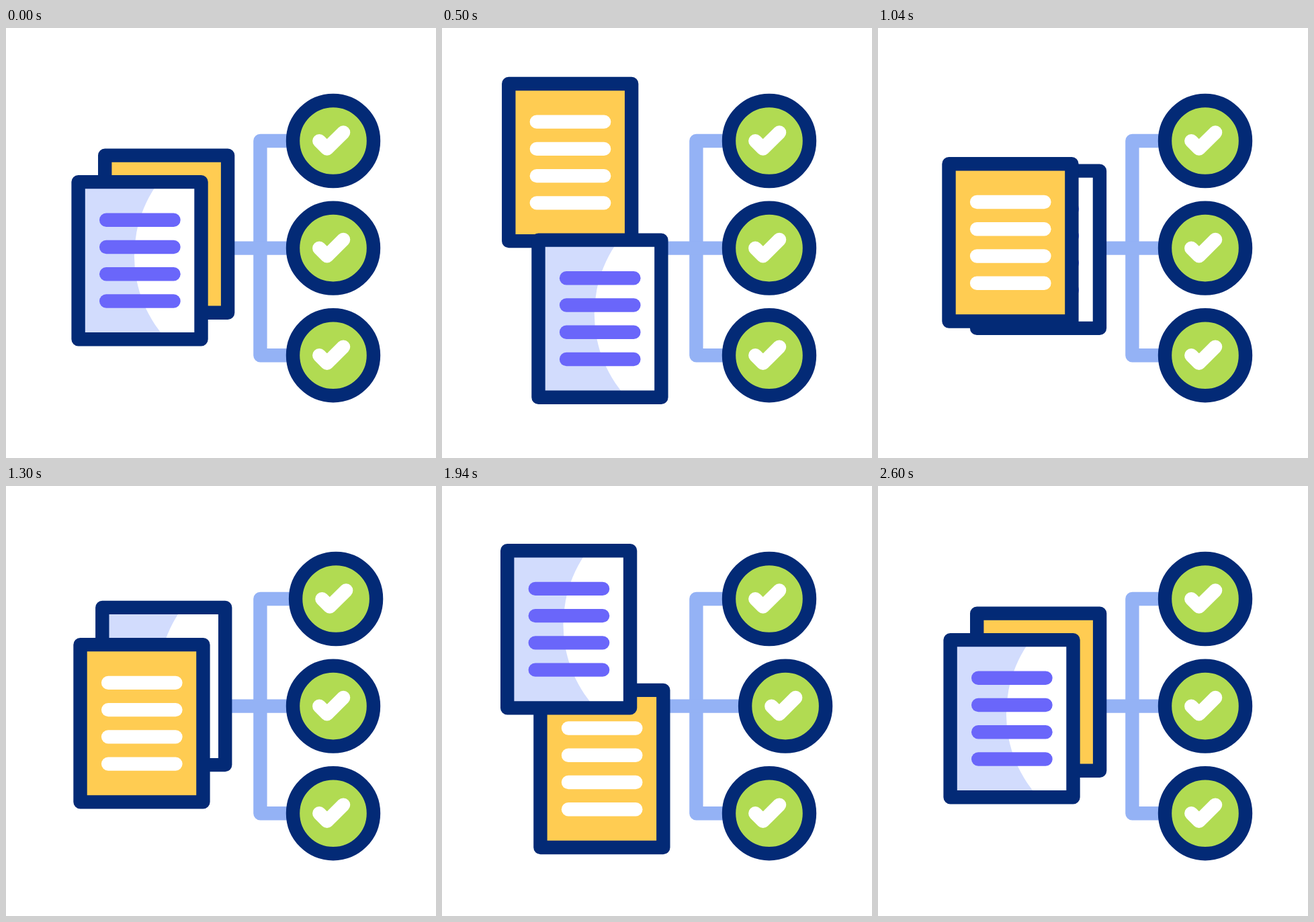
An HTML page with a canvas that plays this animation: 640x640 px, repeating every 2.62 s.

```html
<!DOCTYPE html>
<html lang="en">
<head>
<meta charset="utf-8">
<title>Document flow</title>
<style>
  html, body { margin: 0; width: 100%; height: 100%; overflow: hidden; background: #fff; }
  canvas { display: block; width: 640px; height: 640px; }
</style>
</head>
<body>
<canvas id="stage" width="640" height="640"></canvas>
<script>
const ctx = document.getElementById('stage').getContext('2d');
const LOOP = 2620, SWAP = 600, PUSH = 400, RETURN = 200, REACH = 25.6, LINE = 20.4;
const NAVY = '#032a76', ORANGE = '#ffcc52', PURPLE = '#6a66fa', PALE = '#d2dcfd',
      GREEN = '#b1db52', BLUE = '#94b2f5', WHITE = '#fff';

// Top-left corners of a page on its way round
const FRONT = [97.4, 218.9], LOW = [136.1, 312.2], BACK = [137, 179.4], HIGH = [85.3, 64.4];
const ROUTE = [FRONT, LOW, BACK, HIGH, FRONT];

const ease = u => {
  u = Math.min(1, Math.max(0, u));
  return u * u * (3 - 2 * u);
};

function stroke(points, color) {
  ctx.beginPath();
  points.forEach(([x, y]) => ctx.lineTo(x, y));
  ctx.strokeStyle = color;
  ctx.stroke();
}

function pageCorner(t, shift) {
  const leg = Math.min(3, Math.floor(t / SWAP));
  const k = ease((t - leg * SWAP) / SWAP);
  const i = (leg + shift) % 4;
  return ROUTE[i].map((v, axis) => v + (ROUTE[i + 1][axis] - v) * k);
}

function drawPage([x, y], fill, ink, shaded) {
  const half = LINE / 2, w = 182.9, h = 234.2;
  ctx.save();
  ctx.translate(x, y);
  ctx.fillStyle = fill;
  ctx.fillRect(half, half, w, h);
  if (shaded) {
    ctx.save();
    ctx.beginPath();
    ctx.rect(half, half, w, h);
    ctx.clip();
    ctx.fillStyle = PALE;
    ctx.fillRect(half, half, w, h);
    ctx.fillStyle = fill;
    ctx.beginPath();
    ctx.arc(278.5, 120.4, 185, 0, Math.PI * 2);
    ctx.fill();
    ctx.restore();
  }
  for (let i = 0; i < 4; i++) {
    const row = 66.9 + i * 40.25;
    stroke([[51.8, row], [152.1, row]], ink);
  }
  ctx.strokeStyle = NAVY;
  ctx.strokeRect(half, half, w, h);
  ctx.restore();
}

function drawConnector() {
  stroke([[487, 168], [378.4, 168], [378.4, 487.2], [487, 487.2]], BLUE);
  stroke([[312, 327.6], [487, 327.6]], BLUE);
}

function drawBadge(t, i) {
  const start = 2 * SWAP + i * PUSH, peak = start + PUSH;
  const offset = REACH * (t < peak ? ease((t - start) / PUSH) : 1 - ease((t - peak) / RETURN));
  ctx.save();
  ctx.translate(487 + offset, 168 + i * 159.6);
  ctx.beginPath();
  ctx.arc(0, 0, 60, 0, Math.PI * 2);
  ctx.fillStyle = GREEN;
  ctx.fill();
  ctx.strokeStyle = NAVY;
  ctx.stroke();
  stroke([[-20.7, 0.1], [-9.2, 11.6], [15.1, -12.6]], WHITE);
  ctx.restore();
}

function draw(t) {
  ctx.fillStyle = WHITE;
  ctx.fillRect(0, 0, 640, 640);
  ctx.lineWidth = LINE;
  ctx.lineCap = ctx.lineJoin = 'round';
  drawConnector();
  const pages = [
    () => drawPage(pageCorner(t, 2), ORANGE, WHITE, false),
    () => drawPage(pageCorner(t, 0), WHITE, PURPLE, true)
  ];
  if (t >= SWAP && t < 3 * SWAP) pages.reverse();
  pages.forEach(page => page());
  for (let i = 0; i < 3; i++) drawBadge(t, i);
}

const begin = performance.now();
function tick() {
  draw((performance.now() - begin) % LOOP);
  requestAnimationFrame(tick);
}
tick();
</script>
</body>
</html>
```
